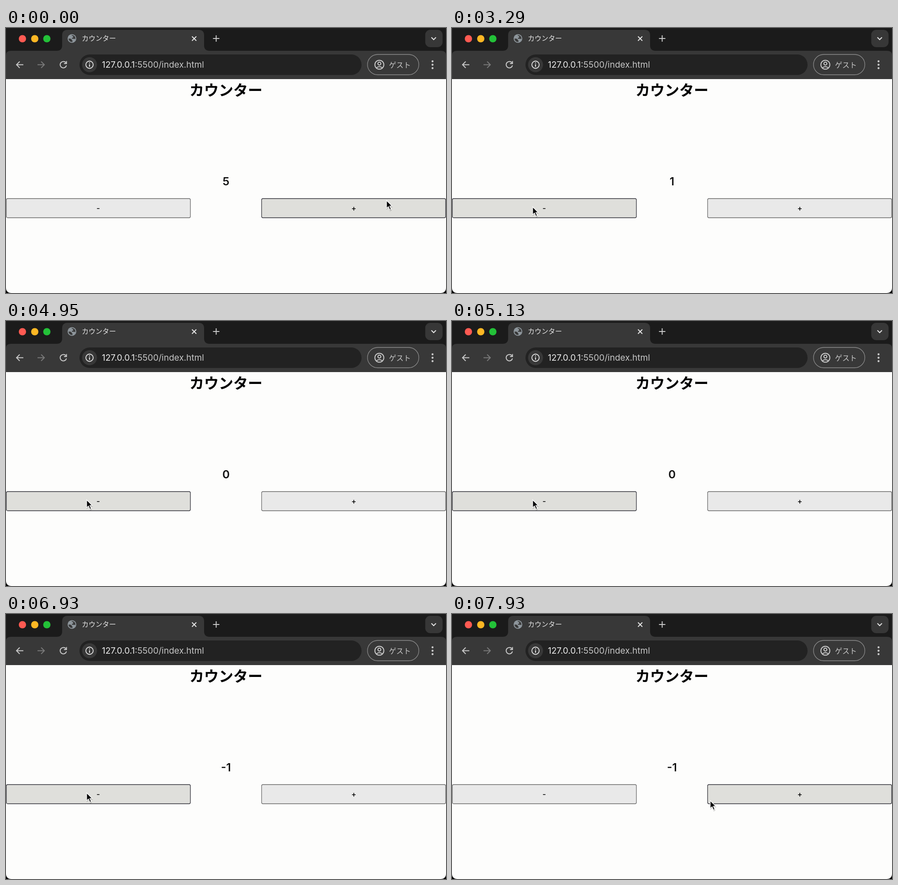
Write an HTML page that moves like this. It is 964 px wide and 581 px high and loops after 8 s.

```html
<!DOCTYPE html>
<html lang="ja">
<head>
<meta charset="utf-8">
<title>カウンター</title>
<style>
  html, body { margin: 0; width: 100%; height: 100%; overflow: hidden; background: #000; }
  svg { display: block; width: 964px; height: 581px; }
  text { font-family: Inter, "Noto Sans CJK JP", "Noto Sans CJK", sans-serif; }
  .ja { font-family: "Noto Sans CJK JP", "Noto Sans CJK", sans-serif; }
  .mid { text-anchor: middle; }
  .line { fill: none; stroke: #c9c9c9; stroke-width: 2; }
  .btn rect { fill: #e9e9e9; stroke: #6a6a6a; stroke-width: 1.3; }
  .btn.hover rect { fill: #dfdfdb; stroke: #33333b; }
  .btn.active rect { fill: #f3f3f3; stroke: #8a8a8a; }
  .btn text { font-size: 16.5px; font-weight: 500; }
</style>
</head>
<body>
<svg viewBox="0 0 964 581">
  <!-- tab strip -->
  <rect width="964" height="60" fill="#1b1b1b"/>
  <circle cx="36" cy="23.5" r="8" fill="#ff5a52"/>
  <circle cx="63" cy="23.5" r="8" fill="#fdb724"/>
  <circle cx="89.500" cy="23.500" r="8" fill="#23c138"/>
  <path d="M0 112V60Q0 50 10 50H111Q123 50 123 38V16Q123 4 135 4H422Q434 4 434 16V38Q434 50 446 50H954Q964 50 964 60V112Z" fill="#383838"/>
  <g transform="translate(144.500 23)">
    <circle r="9.500" fill="#8d959b"/>
    <path d="M-7.500 0C-5 .5-2 0-1 2S2 4 1 7.500A7.500 7.500 0 0 1-7.500 0ZM-1-7.500C0-5 3-6 3-3.500S-1-2 0 0 4-1 7.300 1.500A7.500 7.500 0 0 0-1-7.500Z" fill="#383838"/>
  </g>
  <text class="ja" x="166" y="28" font-size="15" fill="#e6e6e6">カウンター</text>
  <path class="line" d="M407.500 18.500l9.500 9.500m0-9.500l-9.500 9.500" style="stroke:#e6e6e6"/>
  <path class="line" d="M453.500 23h14m-7-7v14"/>
  <rect x="918.500" y="4" width="38" height="38" rx="11" fill="#373737"/>
  <path class="line" d="M932 20.500l5 5 5-5" style="stroke:#e6e6e6"/>

  <!-- toolbar -->
  <path class="line" d="M38 80.500H23m7-7l-7 7 7 7"/>
  <path class="line" d="M69 80.500H84m-7-7l7 7-7 7" style="stroke:#797979"/>
  <path class="line" d="M131.500 76.500A7 7 0 1 0 132.500 82M132.500 72.500V78H127"/>
  <rect x="161" y="58" width="618" height="45" rx="22.500" fill="#222"/>
  <circle cx="183" cy="80.500" r="16.500" fill="#383838"/>
  <circle class="line" cx="183" cy="80.500" r="8" style="stroke:#e2e2e2;stroke-width:1.800"/>
  <path class="line" d="M183 79.500v5.500m0-9.500v2" style="stroke:#e2e2e2"/>
  <text x="210" y="87" font-size="19" fill="#c6c6c6"><tspan fill="#ececec">127.0.0.1</tspan>:5500/index.html</text>
  <rect class="line" x="792" y="58" width="112.500" height="44.500" rx="22.250" style="stroke:#8b8b8b;stroke-width:1.300"/>
  <g class="line" transform="translate(818 80.500)">
    <circle r="9.800"/>
    <circle cy="-2.500" r="3.300"/>
    <path d="M-6.500 7Q0 1.500 6.500 7"/>
  </g>
  <text class="ja" x="839" y="86.500" font-size="16" fill="#c9c9c9">ゲスト</text>
  <g fill="#c9c9c9">
    <circle cx="934.500" cy="73" r="2.200"/>
    <circle cx="934.500" cy="80.500" r="2.200"/>
    <circle cx="934.500" cy="88" r="2.200"/>
  </g>

  <!-- page -->
  <path d="M0 112H964V569Q964 581 952 581H12Q0 581 0 569Z" fill="#fdfdfc"/>
  <text class="ja mid" x="482" y="148" font-size="32" font-weight="700">カウンター</text>
  <text class="mid" id="count" x="482" y="344.500" font-size="24.500" font-weight="600" fill="#111"></text>
  <g class="btn" id="minus">
    <rect x=".7" y="374" width="403.300" height="42" rx="3"/>
    <text class="mid" x="202" y="400.500">-</text>
  </g>
  <g class="btn" id="plus">
    <rect x="560" y="374" width="403.300" height="42" rx="3"/>
    <text class="mid" x="762" y="400.500">+</text>
  </g>
  <g id="cursor">
    <path d="M0 0V19.500L4.500 15.500 7.600 22.800 11.600 21.100 8.500 14H14Z" transform="translate(.6 2)" fill="#000" opacity=".18"/>
    <path d="M.8 1.200V18.200L4.800 14.500 7.900 21.700 10.800 20.500 7.700 13.300H12.800Z" fill="#000" stroke="#fff" stroke-width="1.300"/>
  </g>
</svg>
<script>
  const LOOP = 8000;
  const $ = id => document.getElementById(id);

  // time, x, y of the pointer tip
  const path = [
    [0, 833, 377], [20, 833, 377], [150, 780, 400], [280, 690, 415], [1280, 690, 415],
    [1280, 176, 391], [7190, 176, 391], [7330, 504, 419], [7350, 504, 419],
    [7500, 556, 500], [7600, 570, 515], [7720, 574, 490], [7930, 565, 408], [LOOP, 565, 408]
  ];
  const counts = [[0, '5'], [1280, '2'], [3290, '1'], [4950, '0'], [5970, '-1']];
  const press = [4860, 4950];

  function pointerAt(t) {
    const i = path.findIndex(p => p[0] > t);
    const [t0, x0, y0] = path[i - 1], [t1, x1, y1] = path[i];
    const k = (t - t0) / (t1 - t0);
    return [x0 + (x1 - x0) * k, y0 + (y1 - y0) * k];
  }

  function draw(t) {
    const [x, y] = pointerAt(t);
    const onRow = y >= 374 && y <= 416;
    const pressed = t >= press[0] && t < press[1];
    $('cursor').setAttribute('transform', `translate(${x} ${y})`);
    $('minus').classList.toggle('hover', onRow && x <= 404);
    $('minus').classList.toggle('active', pressed);
    $('plus').classList.toggle('hover', onRow && x >= 560);
    $('count').textContent = counts.filter(c => c[0] <= t).pop()[1];
  }

  const start = performance.now();
  function tick() {
    draw((performance.now() - start) % LOOP);
    requestAnimationFrame(tick);
  }
  tick();
</script>
</body>
</html>
```
